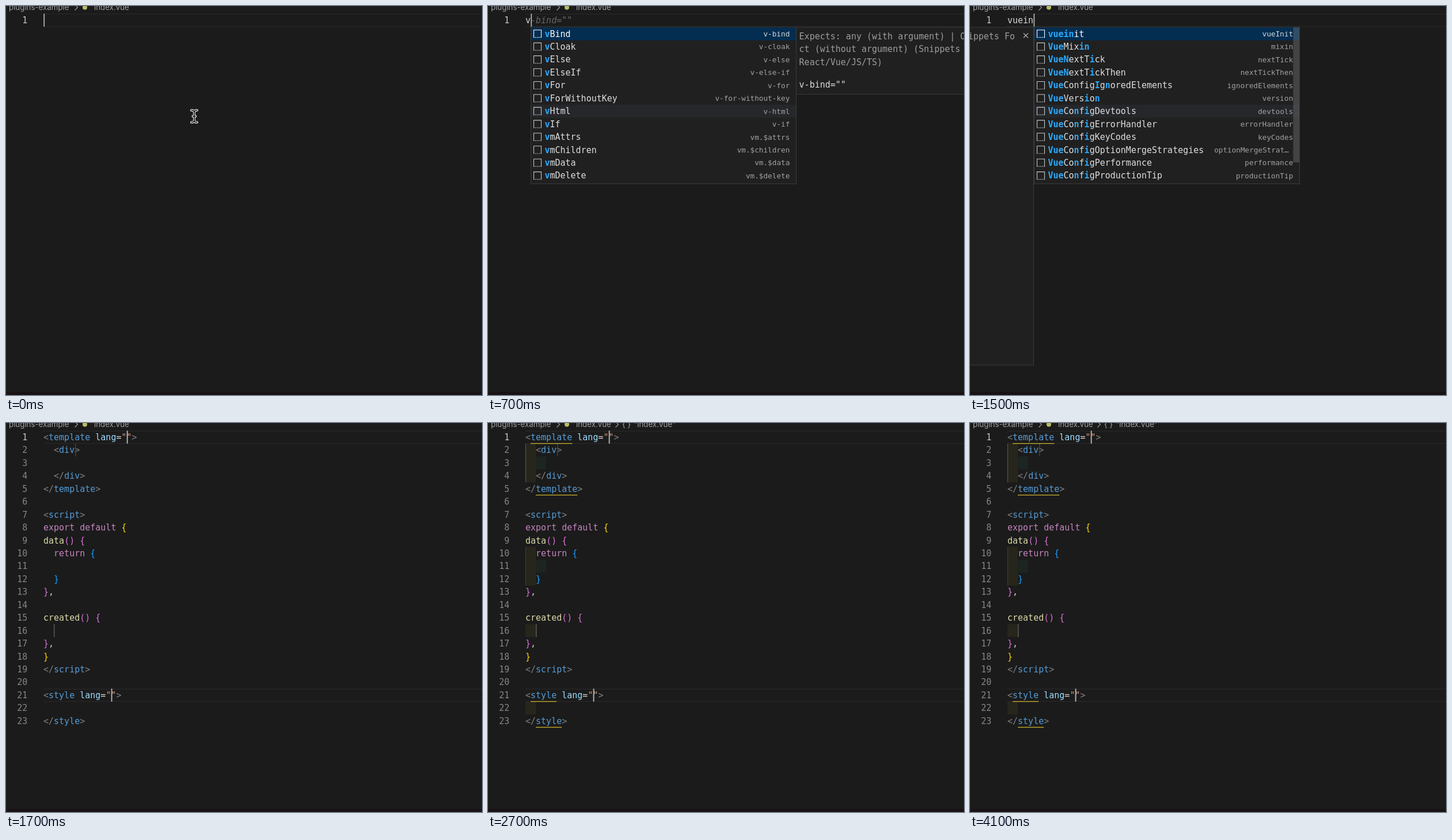
These frames come from a looping animation (827 px wide and 677 px high, 4200 ms). An HTML page:

```html
<!DOCTYPE html>
<html lang="en">
<head>
<meta charset="utf-8">
<title>Snippet completion</title>
<style>
html, body { margin: 0; width: 100%; height: 100%; overflow: hidden; background: #1b1b1b; }
svg { display: block; }
text { white-space: pre; font: 15px "DejaVu Sans Mono", monospace; }
.ui { font: 13.3px Inter, sans-serif; fill: #a0a0a0; }
.detail { font-size: 12.7px; }
.ghost { font-style: italic; fill: #676767; }
.hit { font-weight: bold; fill: #2aaaff; }
</style>
</head>
<body>
<svg id="stage" width="827" height="677" viewBox="0 0 827 677"></svg>
<script>
const LOOP = 4200, LEFT = 65, CH = 9.03, ROW = 22.45;
const stage = document.getElementById('stage');

const esc = s => s.replace(/&/g, '&amp;').replace(/</g, '&lt;');
const text = (x, y, s, attrs = '') => `<text x="${x}" y="${y + 5.3}" ${attrs}>${s}</text>`;
const rect = (x, y, w, h, fill, attrs = '') =>
  `<rect x="${x}" y="${y}" width="${w}" height="${h}" fill="${fill}" ${attrs}/>`;
const path = (d, color, width = 1, attrs = '') =>
  `<path d="${d}" fill="none" stroke="${color}" stroke-width="${width}" ${attrs}/>`;
const mid = line => 24.6 + ROW * (line - 1);
const rowTop = line => mid(line) - ROW / 2;
const col = n => LEFT + CH * n;

// Each segment starts with its colour key.
const COLORS = { g: '#808080', t: '#569cd6', a: '#9cdcfe', w: '#d4d4d4', s: '#ce9178',
  k: '#c586c0', y: '#ffd700', p: '#da70d6', u: '#179fff', f: '#dcdcaa' };
const CODE = [
  'g<|ttemplate|a lang|w=|s""|g>', 'g  <|tdiv|g>', '', 'g  </|tdiv|g>', 'g</|ttemplate|g>', '',
  'g<|tscript|g>', 'kexport default |y{', 'fdata|p() {', 'k  return |u{', '', 'u  }', 'p}|w,', '',
  'fcreated|p() {', '', 'p}|w,', 'y}', 'g</|tscript|g>', '',
  'g<|tstyle|a lang|w=|s""|g>', '', 'g</|tstyle|g>'
].map(line => line ? line.split('|') : []);

const plain = CODE.map(line => line.map(s => s.slice(1)).join(''));

// Menu entries: label:detail, with matched letters between asterisks.
const parse = s => s.split(' ').map(e => e.split(':'));
const mark = (items, re, to) => items.map(([l, d]) => [l.replace(/\*/g, '').replace(re, to), d]);

const vItems = mark(parse('vBind:v-bind vCloak:v-cloak vElse:v-else vElseIf:v-else-if vFor:v-for ' +
  'vForWithoutKey:v-for-without-key vHtml:v-html vIf:v-if vmAttrs:vm.$attrs ' +
  'vmChildren:vm.$children vmData:vm.$data vmDelete:vm.$delete'), /^v/, '*v*');
const vueItems = parse('vueExtend:extend vueinit:vueInit VueCompile:compile VueComponent:component ' +
  'VueConfigDevtools:devtools VueConfigErrorHandler:errorHandler ' +
  'VueConfigIgnoredElements:ignoredElements VueConfigKeyCodes:keyCodes ' +
  'VueConfigOptionMergeStrategies:optionMergeStrat… VueConfigPerformance:performance ' +
  'VueConfigProductionTip:productionTip VueConfigSilent:silent');
const inItems = parse('*vuein*it:vueInit *Vue*Mix*in*:mixin *VueN*extT*i*ck:nextTick ' +
  '*VueN*extT*i*ckThen:nextTickThen *Vue*Config*I*g*n*oredElements:ignoredElements ' +
  '*Vue*Vers*i*o*n*:version *Vue*Co*n*f*i*gDevtools:devtools ' +
  '*Vue*Co*n*f*i*gErrorHandler:errorHandler *Vue*Co*n*f*i*gKeyCodes:keyCodes ' +
  '*Vue*Co*n*f*i*gOptionMergeStrategies:optionMergeStrat… ' +
  '*Vue*Co*n*f*i*gPerformance:performance *Vue*Co*n*f*i*gProductionTip:productionTip');

const bindDoc = { about: ['Expects: any (with argument) | Obje', 'ct (without argument) (Snippets For',
  'React/Vue/JS/TS)'], code: ['v-bind=""'] };
const extendDoc = { about: ['Vue.extend( options ) (Snippets For', 'React/Vue/JS/TS)'],
  code: ['Vue.extend({', '    template:template', '})'] };
const initDoc = { about: ['vueinit (Snippets For', 'React/Vue/JS/TS)'], code: plain };

const STEPS = [
  { at: 0, typed: '' },
  { at: 500, typed: 'v' },
  { at: 600, typed: 'v', ghost: '-bind=""', items: vItems, doc: bindDoc },
  { at: 800, typed: 'vu', items: mark(vueItems, /^vu/i, '*$&*'), doc: extendDoc, thumb: 64 },
  { at: 1000, typed: 'vue', items: mark(vueItems, /^vue/i, '*$&*'), doc: extendDoc, thumb: 64 },
  { at: 1300, typed: 'vuei', items: mark(inItems, /^(vue)(.*?)(i)/i, '*$1*$2*$3*'), doc: initDoc, thumb: 235 },
  { at: 1500, typed: 'vuein', items: inItems, docLeft: true, thumb: 235 },
  { at: 1700, file: true },
  { at: 1800, file: true, tint: true },
  { at: 2100, file: true, tint: true, lint: true }
];

const caret = (n, line) => rect(col(n) + .4, rowTop(line), 1.7, ROW, '#b8b8b6');
const activeLine = line =>
  path(`M${LEFT} ${rowTop(line) + .7}H827M${LEFT} ${rowTop(line) + ROW - .3}H827`, '#282828', 1.3);
const number = n => text(37.3, mid(n), n, `text-anchor="end" fill="${n === 1 ? '#c6c6c6' : '#858585'}"`);

function crumbs(lint) {
  const chevron = x => path(`M${x} -2.5l5 5l-5 5`, '#a0a0a0', 1.1);
  const label = (x, s) => text(x, 1.4, s, 'class="ui"');
  let out = label(5, 'plugins-example') + chevron(119.5) +
    '<circle cx="137" cy="2.5" r="4" fill="#b9bb62"/>' + label(153, 'index.vue');
  if (lint) out += chevron(221.5) + label(233, '{ }') + label(253, '"index.vue"');
  return out;
}

function pointer() {
  const d = 'M322 181.5Q327 181.5 327 185V199Q327 202.5 322 202.5M332 181.5Q327 181.5 327 185' +
    'M327 199Q327 202.5 332 202.5M324.5 192H329.5';
  return path(d, '#f2f2f2', 4, 'stroke-linecap="round"') + path(d, '#111', 1.7, 'stroke-linecap="round"');
}

function menu(x, items, thumb) {
  let out = rect(x + .5, 37, 461, 272.5, '#202020', 'stroke="#3b3b3b"');
  items.forEach(([label, detail], i) => {
    const y = 48.2 + ROW * i, on = i === 0;
    if (on) out += rect(x + 1, 37.3, 460, ROW, '#042e51');
    if (i === 6) out += rect(x + 1, y - ROW / 2, 460, ROW, '#25272b');
    const ink = on ? '#fff' : '#c5c5c5';
    out += path(`M${x + 5.5} ${y + 6.5}v-13h13v13`, ink, 1.1) +
      path(`M${x + 5} ${y + 6.5}h14`, ink, 1.2, 'stroke-dasharray="1.6 1.4"');
    const spans = label.split('*').map((s, k) => k % 2 ? `<tspan class="hit">${s}</tspan>` : s).join('');
    out += text(x + 24.4, y, spans, `fill="${on ? '#fff' : '#dedede'}"`);
    out += text(x + (detail.endsWith('…') ? 443 : 450.3), y - .6, detail,
      `class="detail" text-anchor="end" fill="${on ? '#d3dae0' : '#a2a2a2'}"`);
  });
  if (thumb) out += rect(x + 450.5, 37.3, 10.5, thumb, '#797979', 'fill-opacity=".4"');
  return out;
}

function docs(x, { about, code }) {
  const y = 52.3, first = y + ROW * (about.length - 1) + 39.4;
  const bottom = first + ROW * (code.length - 1) + 17;
  return rect(x + .5, 37, 400, bottom - 37, '#202020', 'stroke="#3b3b3b"') +
    about.map((s, i) => text(x + 5.6, y + ROW * i, esc(s), 'fill="#9d9d9d"')).join('') +
    code.map((s, i) => text(x + 5.6, first + ROW * i, esc(s), 'fill="#dcdcdc"')).join('');
}

function docsLeft(x) {
  return rect(x - 400.5, 37, 400, 588, '#202020', 'stroke="#3b3b3b"') +
    text(78, 52.3, 'vueinit (Snippets Fo', 'text-anchor="end" fill="#9d9d9d"') +
    path('M93 47.3l8 8m0 -8l-8 8', '#c5c5c5', 1.2);
}

function tints() {
  const block = (n, from, to, fill) => rect(col(n), rowTop(from), CH * 2, ROW * (to - from + 1), fill);
  const guide = (n, from, to, color) => path(`M${col(n) + .5} ${rowTop(from)}V${rowTop(to + 1)}`, color, 1.2);
  const warm = '#27261c', cool = '#1d2521';
  return block(0, 2, 4, warm) + block(2, 3, 3, cool) + block(0, 10, 12, warm) +
    block(2, 11, 11, cool) + block(0, 16, 16, warm) + block(0, 22, 22, warm) +
    guide(0, 2, 4, '#555550') + guide(0, 10, 12, '#3c3c34');
}

function file({ tint, lint }, lit) {
  let out = activeLine(1) + activeLine(21);
  if (tint) out += tints();
  CODE.forEach((line, i) => {
    const spans = line.map(s => `<tspan fill="${COLORS[s[0]]}">${esc(s.slice(1))}</tspan>`).join('');
    out += number(i + 1) + text(LEFT, mid(i + 1), spans);
  });
  // Waiting tab stops of the snippet.
  out += rect(col(6) + 1, rowTop(2), 1.5, ROW, '#424242') + rect(col(2), rowTop(16), 1.5, ROW, '#5a5a5a');
  out += rect(col(16), rowTop(1), 2, ROW, '#444') + rect(col(13), rowTop(21), 2, ROW, '#444');
  if (lint) {
    for (const [line, n, len] of [[1, 1, 8], [5, 2, 8], [21, 1, 5], [23, 2, 5]])
      out += rect(col(n), mid(line) + 10.4, CH * len, 1.3, '#c9b02f');
  }
  if (lit) out += caret(16, 1) + caret(13, 21);
  return out;
}

function typing(step, lit) {
  const { typed, ghost, items, doc, docLeft, thumb } = step, end = typed.length;
  const x = Math.round(col(end) + .4);
  let out = activeLine(1) + number(1) + text(LEFT, mid(1), typed, 'fill="#d4d4d4"');
  if (ghost) out += text(col(end), mid(1), ghost, 'class="ghost"');
  if (lit) out += caret(end, 1);
  if (!typed) out += pointer();
  if (doc) out += docs(x + 461, doc);
  if (docLeft) out += docsLeft(x);
  if (items) out += menu(x, items, thumb);
  return out;
}

// The caret blinks every 500 ms, starting again when the snippet is inserted.
function caretLit(t) {
  if (t < 1700) return t < 200 || t >= 500;
  return Math.floor((t - 1700) / 500) % 2 === 0;
}

let shown = '';
function draw(t) {
  const i = STEPS.findLastIndex(s => t >= s.at), lit = caretLit(t), key = i + '/' + lit;
  if (key === shown) return;
  shown = key;
  const step = STEPS[i];
  stage.innerHTML = rect(0, 0, 827, 677, '#1b1b1b') + rect(0, 672, 827, 5, '#191214') +
    crumbs(step.lint) + (step.file ? file(step, lit) : typing(step, lit));
}

let began;
function tick(now) {
  began ??= now;
  draw(Math.max(0, now - began) % LOOP);
  requestAnimationFrame(tick);
}
draw(0);
requestAnimationFrame(tick);
</script>
</body>
</html>
```
